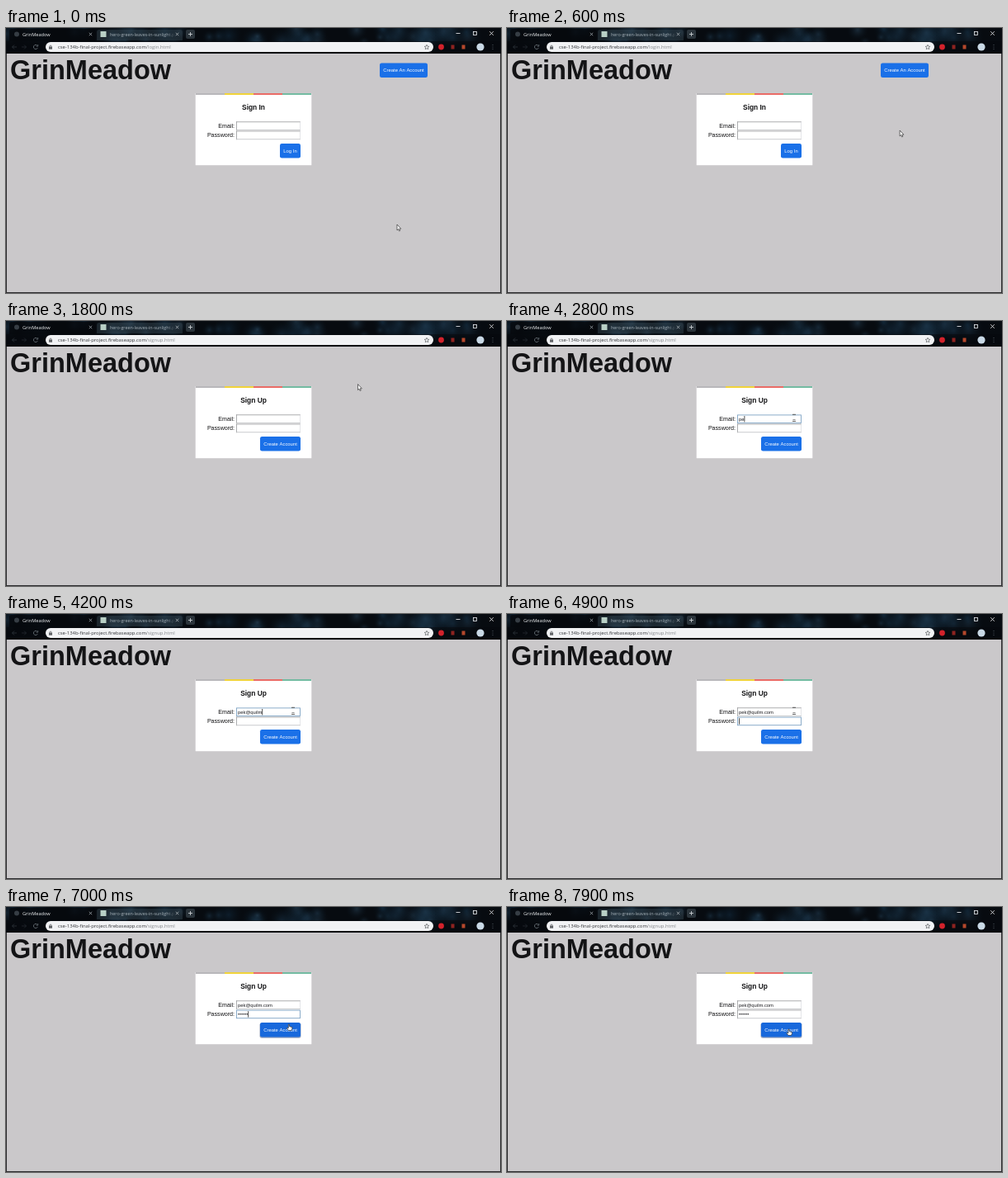
Animation, 600 px wide and 321 px high, one loop 8000 ms. Source, as an HTML page with a canvas:

```html
<!DOCTYPE html>
<html lang="en">
<head>
<meta charset="utf-8">
<title>Sign up</title>
<style>
html, body { margin: 0; width: 100%; height: 100%; overflow: hidden; background: #000; }
canvas { display: block; width: 600px; height: 321px; }
</style>
</head>
<body>
<canvas id="stage" width="600" height="321"></canvas>
<script>
const ctx = document.getElementById('stage').getContext('2d');
const LOOP = 8000, STEP = 100;
const PAGE = '"Liberation Sans", Arial, sans-serif';
const UI = '"Open Sans", "Noto Sans", sans-serif';
const SITE = 'GrinMeadow';
const HOST = 'cse-134b-final-project.firebaseapp.com';
const EMAIL = 'pek@quilm.com';

// Event times in ms
const CLICK = 1000, LOADED = 1300, FOCUS = 2300, TAB = 4800, SUBMIT = 7500;

// Steady typing, with a quicker ".com" at the end
const emailCount = t => t < 4200 ? keys(t, 2600, 200, 8) : 9 + keys(t, 4300, 120, 4);
const passCount = t => keys(t, 5100, 200, 6);

// Mouse: [start, end, x0, y0, x1, y1]
const MOVES = [
  [200, 900, 474, 238, 477.5, 50],
  [1500, 2200, 477.5, 50, 348, 117.5],
  [6500, 7200, 348, 117.5, 341, 148]
];

function keys(t, first, gap, max) {
  return Math.max(0, Math.min(max, Math.floor((t - first) / gap) + 1));
}

function rect(x, y, w, h, color) {
  ctx.fillStyle = color;
  ctx.fillRect(x, y, w, h);
}

function round(x, y, w, h, r, color) {
  ctx.fillStyle = color;
  ctx.beginPath();
  ctx.roundRect(x, y, w, h, r);
  ctx.fill();
}

function disc(x, y, r, color) {
  ctx.fillStyle = color;
  ctx.beginPath();
  ctx.arc(x, y, r, 0, Math.PI * 2);
  ctx.fill();
}

function line(points, color, width = 0.8) {
  ctx.strokeStyle = color;
  ctx.lineWidth = width;
  ctx.beginPath();
  points.forEach(([x, y], i) => i ? ctx.lineTo(x, y) : ctx.moveTo(x, y));
  ctx.stroke();
}

function arc(x, y, r, from, to, color, width = 0.9) {
  ctx.strokeStyle = color;
  ctx.lineWidth = width;
  ctx.beginPath();
  ctx.arc(x, y, r, from, to);
  ctx.stroke();
}

function cross(x, y, r, color) {
  line([[x - r, y - r], [x + r, y + r]], color);
  line([[x + r, y - r], [x - r, y + r]], color);
}

function text(str, x, y, font, color, align = 'left') {
  ctx.font = font;
  ctx.fillStyle = color;
  ctx.textAlign = align;
  ctx.fillText(str, x, y);
  return ctx.measureText(str).width;
}

function fadedText(str, x, y, end, font, color) {
  const fade = ctx.createLinearGradient(end - 10, 0, end, 0);
  fade.addColorStop(0, color);
  fade.addColorStop(1, 'rgba(190,195,200,0)');
  ctx.save();
  ctx.beginPath();
  ctx.rect(x, 0, end - x, 15);
  ctx.clip();
  text(str, x, y, font, fade);
  ctx.restore();
}

function seeded(seed) {
  return () => (seed = (seed * 16807) % 2147483647) / 2147483647;
}

// Soft night-sky theme behind the tabs
function drawTheme() {
  rect(0, 0, 600, 31, '#070b10');
  const rnd = seeded(71);
  ctx.save();
  ctx.beginPath();
  ctx.rect(0, 0, 600, 31);
  ctx.clip();
  for (let i = 0; i < 60; i++) {
    const x = rnd() * 560, y = rnd() * 20, r = 6 + rnd() * 16;
    const tone = 26 + Math.floor(rnd() * 30);
    const glow = ctx.createRadialGradient(x, y, 0, x, y, r);
    glow.addColorStop(0, `rgba(${tone - 8},${tone + 20},${tone + 42},.5)`);
    glow.addColorStop(1, 'rgba(8,20,30,0)');
    rect(x - r, y - r, 2 * r, 2 * r, glow);
  }
  ctx.restore();
}

function drawTabs(loading, t) {
  round(4, 1, 104, 15, [3, 3, 0, 0], 'rgba(6,9,13,.75)');
  round(110, 2, 104, 13, [3, 3, 0, 0], 'rgba(62,78,88,.4)');
  if (loading) {
    const a = t / 130;
    arc(13, 7.5, 2.8, a, a + 4.2, '#6f7c88', 1);
  } else {
    disc(13, 7.5, 3, '#363d44');
  }
  const title = loading ? 'https://' + HOST : SITE;
  fadedText(title, 20, 9.6, 99, '5.6px ' + UI, '#f2f4f5');
  cross(102.5, 7.5, 1.7, '#a5abb0');

  rect(114.5, 4, 7, 7, '#b9d0c6');
  fadedText('hero-green-leaves-in-sunlight.png', 126, 9.6, 205, '5.4px ' + UI, '#a4afb6');
  cross(207.5, 7.5, 1.7, '#b4babe');
  round(218, 2, 11, 11, 2, 'rgba(52,62,70,.8)');
  line([[221, 7.5], [226, 7.5]], '#d9dde0');
  line([[223.5, 5], [223.5, 10]], '#d9dde0');

  line([[545.5, 6.5], [550.5, 6.5]], '#f0f2f4');
  ctx.strokeRect(566.5, 4.5, 4, 4);
  cross(588.5, 6.5, 2.3, '#f0f2f4');
}

function drawToolbar(loading, signup) {
  rect(0, 16, 600, 15, 'rgba(6,9,13,.5)');
  line([[13, 23], [7.5, 23]], '#2f363d');
  line([[10, 20.5], [7.5, 23], [10, 25.5]], '#2f363d');
  line([[19, 23], [24.5, 23]], '#242a30');
  line([[22, 20.5], [24.5, 23], [22, 25.5]], '#242a30');
  if (loading) {
    cross(36, 23, 2.3, '#646b71');
  } else {
    arc(36, 23, 2.6, 0.4, 5.7, '#646b71');
    line([[38.7, 20], [38.7, 22.2], [36.6, 22.2]], '#646b71');
  }

  round(48, 17, 470, 12, 6, '#f1f2f4');
  rect(52, 22.5, 4, 3.2, '#606367');
  arc(54, 22.4, 1.3, Math.PI, 0, '#606367', 0.7);
  const font = '5.9px ' + UI;
  const w = text(HOST, 63, 25.2, font, '#35373b');
  text(signup ? '/signup.html' : '/login.html', 63 + w, 25.2, font, '#85888c');

  // Bookmark star
  const star = [];
  for (let i = 0; i <= 10; i++) {
    const a = -Math.PI / 2 + i * Math.PI / 5, r = i % 2 ? 1.4 : 3;
    star.push([510 + r * Math.cos(a), 23.3 + r * Math.sin(a)]);
  }
  line(star, '#5c6064', 0.7);

  disc(527.5, 23, 3.4, '#d3222b');
  rect(539.5, 20.5, 4, 5, '#8e2320');
  rect(552.5, 20.5, 4, 5, '#b5482c');
  disc(575, 23, 4.6, '#c9d9e6');
  for (const y of [20.5, 23, 25.5]) disc(590, y, 0.6, '#59636b');
}

function button(x, y, w, label, hover) {
  const h = 17.5;
  if (hover) round(x - 0.5, y + 0.5, w + 1, h + 0.8, 2.5, 'rgba(20,50,110,.45)');
  round(x, y, w, h, 2.3, hover ? '#1768dc' : '#1a70e8');
  text(label, x + w / 2, y + 10.9, '5.9px ' + PAGE, '#fff', 'center');
}

function field(y, focused) {
  rect(279, y, 78, 10.6, '#fff');
  if (focused) {
    ctx.lineWidth = 0.9;
    ctx.strokeStyle = '#7ea3c4';
    ctx.strokeRect(279.5, y + 0.5, 77, 9.6);
  } else {
    rect(279, y, 78, 0.8, '#98999c');
    rect(279, y, 0.8, 10.6, '#98999c');
    rect(279, y + 9.8, 78, 0.8, '#bcbdc0');
    rect(356.3, y, 0.7, 10.6, '#d8dade');
  }
}

function caret(x, y) {
  rect(x, y, 0.8, 7.4, '#222');
}

function drawCard(t, signup, onSubmit) {
  rect(229.7, 79, 140.6, 87.2, '#fff');
  ['#b8b7ba', '#f0d33a', '#ea6c66', '#73bba2'].forEach((c, i) => rect(230 + i * 35, 79, 35, 2, c));
  text(signup ? 'Sign Up' : 'Sign In', 300, 99, 'bold 8.4px ' + PAGE, '#111113', 'center');
  text('Email:', 277, 121.2, '7.1px ' + PAGE, '#111113', 'right');
  text('Password:', 277, 132, '7.1px ' + PAGE, '#111113', 'right');

  const onEmail = t >= FOCUS && t < TAB;
  const onPass = t >= TAB && t < SUBMIT;
  field(113.4, onEmail);
  field(124.6, onPass);

  const w = text(EMAIL.slice(0, emailCount(t)), 281, 121, '5.85px ' + PAGE, '#1c1c20');
  if (onEmail) caret(281 + w, 115);

  const dots = passCount(t);
  for (let i = 0; i < dots; i++) disc(282 + i * 2.05, 129.8, 0.8, '#1c1c20');
  if (onPass) caret(281 + dots * 2.05, 126.2);

  if (signup) button(308, 140, 49, 'Create Account', onSubmit);
  else button(332, 140, 25, 'Log In', false);
}

function shape(x, y, points) {
  ctx.beginPath();
  points.forEach(([dx, dy], i) => i ? ctx.lineTo(x + dx, y + dy) : ctx.moveTo(x + dx, y + dy));
  ctx.closePath();
  ctx.fillStyle = '#fff';
  ctx.strokeStyle = '#333';
  ctx.lineWidth = 0.7;
  ctx.fill();
  ctx.stroke();
}

function arrow(x, y) {
  shape(x, y, [[0, 0], [0, 7], [1.5, 5.6], [2.6, 8], [3.7, 7.5], [2.7, 5.2], [4.8, 5.2]]);
}

function hand(x, y) {
  shape(x, y, [[0, 0], [1.1, 0], [1.2, 2.8], [4.4, 3.6], [4.4, 5.5], [3.5, 7.5],
    [0, 7.5], [-2.1, 4.7], [-1.4, 4], [-0.1, 4.9]]);
}

function beam(x, y) {
  rect(x - 2, y - 4.7, 4, 0.9, '#444');
  rect(x - 1.6, y + 1.8, 3.2, 0.7, '#666');
  rect(x - 2, y + 3.4, 4, 0.9, '#444');
}

function mouseAt(t) {
  let pos = MOVES[0].slice(2, 4);
  for (const [from, to, x0, y0, x1, y1] of MOVES) {
    if (t < from) break;
    const p = Math.min(1, (t - from) / (to - from));
    const e = p * p * (3 - 2 * p);
    pos = [x0 + (x1 - x0) * e, y0 + (y1 - y0) * e];
  }
  return pos;
}

function inside([x, y], left, top, w, h) {
  return x >= left && x <= left + w && y >= top && y <= top + h;
}

function draw(t) {
  const signup = t >= LOADED;
  const loading = t >= CLICK && !signup;
  const mouse = mouseAt(t);
  const onCreate = !signup && inside(mouse, 453, 42, 58, 18);
  const onSubmit = signup && inside(mouse, 308, 140, 49, 17.5);

  drawTheme();
  drawToolbar(loading, t >= CLICK);
  drawTabs(loading, t);

  rect(0, 31, 600, 290, '#2c2c2e');
  rect(1, 31, 598, 289, '#cac8ca');
  text(SITE, 5, 62, 'bold 32.5px ' + PAGE, '#141416');
  if (!signup) button(453, 42.5, 58, 'Create An Account', onCreate);
  drawCard(t, signup, onSubmit);

  if (onCreate || onSubmit) hand(...mouse);
  else if (inside(mouse, 279, 113, 78, 22)) beam(...mouse);
  else arrow(...mouse);
}

const start = performance.now();
function frame() {
  const t = (performance.now() - start) % LOOP;
  draw(Math.floor(t / STEP) * STEP);
  requestAnimationFrame(frame);
}
frame();
</script>
</body>
</html>
```
